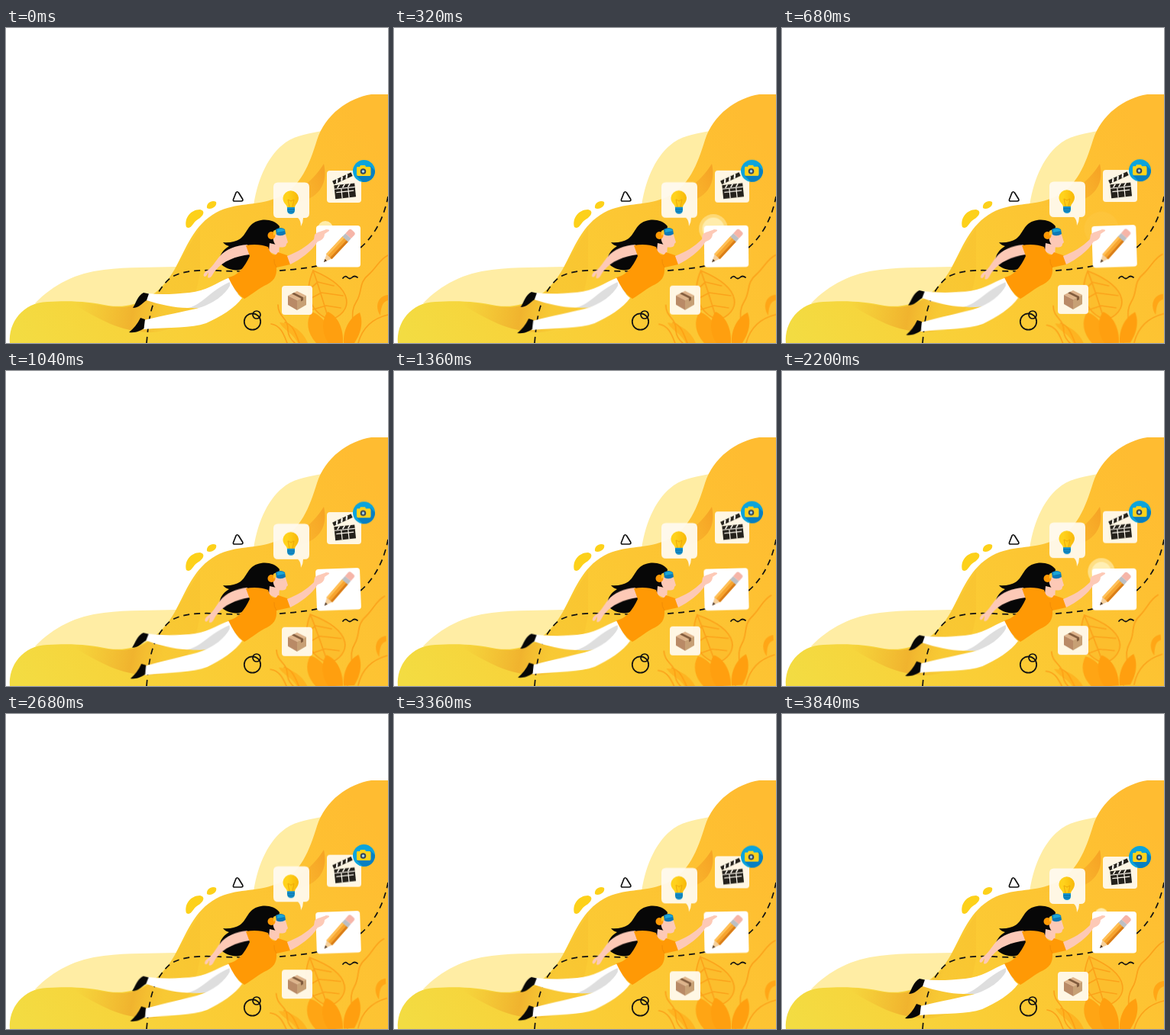
These frames come from a looping animation (500x413 px, 3.88 s). An HTML page without scripts:

```html
<!DOCTYPE html>
<html lang="en">
<head>
<meta charset="utf-8">
<title>Floating creator</title>
<style>
html, body { margin: 0; width: 100%; height: 100%; overflow: hidden; background: #fff; }
svg { display: block; width: 500px; height: 413px; }

.bob { animation: bob 3.88s cubic-bezier(.37, 0, .63, 1) infinite; }
.tilt { animation: tilt 1.94s cubic-bezier(.37, 0, .63, 1) infinite; }
.sway { --a: -4deg; transform-origin: 430px 413px; animation: tilt 3.88s cubic-bezier(.37, 0, .63, 1) infinite; }
@keyframes bob { 50% { transform: translateY(var(--y)); } }
@keyframes tilt { 50% { transform: rotate(var(--a)); } }

.front-leg { --a: -1.9deg; transform-origin: 295px 345px; }
.rear-leg { --a: 2deg; transform-origin: 290px 335px; }
.back-arm { --a: -2.8deg; transform-origin: 316px 290px; }
.note { --a: -2.2deg; transform-origin: 435px 286px; }

.ripple { fill: #fff6c8; transform-origin: 418px 263px; animation: ripple 1.94s linear infinite; }
.late { animation-delay: -1.77s; }
@keyframes ripple {
  0% { transform: scale(1); opacity: .8; }
  14% { transform: scale(1.8); opacity: .55; }
  28% { transform: scale(2.3); opacity: 0; }
  85% { transform: scale(0); opacity: 0; }
  86% { transform: scale(0); opacity: .8; }
  100% { transform: scale(1); opacity: .8; }
}

.line { fill: none; stroke: #111; stroke-width: 1.7; stroke-linecap: round; stroke-linejoin: round; }
.card { fill: #fffaf0; fill-opacity: .94; }
.pale { fill: #ffeda4; }
.skin { fill: #fdc9b6; }
.ink { fill: #070707; }
.white { fill: #fff; }
.vein { fill: none; stroke: #fba21a; stroke-width: 1.7; stroke-linecap: round; }
.leaf { fill: #ff9f0f; }
</style>
</head>
<body>
<svg viewBox="0 0 500 413">
  <defs>
    <linearGradient id="hill" gradientUnits="userSpaceOnUse" x1="20" y1="413" x2="460" y2="110">
      <stop offset="0" stop-color="#f3dc42"/>
      <stop offset=".45" stop-color="#fbcb34"/>
      <stop offset="1" stop-color="#ffbc31"/>
    </linearGradient>
    <linearGradient id="foldLow" gradientUnits="userSpaceOnUse" x1="90" y1="365" x2="205" y2="385">
      <stop offset="0" stop-color="#f0b52e" stop-opacity="0"/>
      <stop offset=".65" stop-color="#efae2c" stop-opacity=".85"/>
      <stop offset="1" stop-color="#f6bd2d" stop-opacity=".35"/>
    </linearGradient>
    <linearGradient id="foldHigh" gradientUnits="userSpaceOnUse" x1="340" y1="230" x2="418" y2="195">
      <stop offset="0" stop-color="#f6b12b" stop-opacity="0"/>
      <stop offset="1" stop-color="#f5a023" stop-opacity=".85"/>
    </linearGradient>
    <linearGradient id="bulb">
      <stop offset=".3" stop-color="#ffd21c"/>
      <stop offset="1" stop-color="#f8b808"/>
    </linearGradient>
  </defs>

  <!-- hills -->
  <path class="pale" d="M38 361C62 336 92 321 128 317C160 313 192 314 224 313L210 375H60Z"/>
  <path class="pale" d="M324 232C330 195 344 166 366 150C381 140 398 138 414 135L405 220Z"/>
  <path fill="url(#hill)" d="M5 413C3 386 22 360 54 359C88 357 109 359 134 364C170 369 200 352 221 316C236 288 246 258 275 242C302 228 325 234 354 223C386 211 398 176 407 147C418 113 448 92 478 87H500V413Z"/>
  <path fill="url(#foldLow)" d="M85 360C112 359 129 366 152 366C184 364 207 344 222 314L254 262V320C246 370 230 398 190 399C150 399 120 381 85 360Z"/>
  <path fill="url(#foldHigh)" d="M326 231C372 226 400 204 416 178C421 200 413 216 396 224C374 234 350 235 326 231Z"/>

  <!-- foliage -->
  <g class="sway">
    <g class="vein">
      <path fill="#fbb829" fill-opacity=".55" d="M402 318C390 346 396 371 424 383C454 373 459 342 402 318Z"/>
      <path d="M402 318Q414 352 431 413M408 333L397 343M413 347L396 356M419 364L402 369M408 333L429 338M413 347L441 351M419 364L438 367"/>
      <path d="M356 363C356 380 370 379 369 397Q370 406 378 413M365 386C375 388 379 400 384 413M347 388C360 390 364 403 368 413"/>
      <path d="M447 413C461 387 447 377 459 358C467 345 461 334 475 323C486 313 489 303 500 298M461 413C467 391 483 380 500 376"/>
    </g>
    <path class="leaf" d="M400 372C413 376 426 393 432 413H406C394 400 392 384 400 372Z" opacity=".85"/>
    <path class="leaf" d="M421 372C434 377 442 394 441 413H422C413 400 413 382 421 372Z"/>
    <path class="leaf" d="M463 373C469 389 462 404 456 413H442C441 396 449 380 463 373Z"/>
    <path class="leaf" d="M500 350C487 351 482 365 490 377C491 365 493 359 500 357Z" opacity=".8"/>
    <path class="leaf" d="M382 413C374 398 364 397 358 386C371 387 388 395 395 413Z" opacity=".5"/>
  </g>

  <!-- trail and doodles -->
  <path class="line" stroke-dasharray="8 6" style="stroke-linecap:butt" d="M184 413C187 380 190 349 216 327C240 313 276 319 305 319C350 320 403 317 440 303C473 289 493 258 500 221"/>
  <path fill="#fdd11a" d="M236 261C233 249 242 238 254 238C262 240 258 247 251 251C244 255 243 265 236 261ZM263 236C262 229 270 225 275 228C277 234 268 239 263 236Z"/>
  <path class="line" d="M297.500 225L301 216Q302.500 213.500 304.500 216L309.500 224Q311 227 307.500 227H299Q297 227 297.500 225Z"/>
  <path class="line" d="M441 328Q444 324 447 327T453 327T460 327"/>
  <circle class="line" cx="322.500" cy="385" r="10.700"/>
  <circle class="line" cx="328" cy="376" r="5"/>

  <!-- clapper card -->
  <g class="bob" style="--y:-3.500px">
    <rect class="card" x="420" y="187" width="45" height="42" rx="4"/>
    <g transform="rotate(-6 442 212)">
      <path fill="#25221c" d="M430 205H457V223H430Z"/>
      <path stroke="#fffaf0" stroke-width="1.200" d="M430 210H457M432 214.500H455M439 210V223M448 210V223"/>
      <g transform="rotate(-19 430 204)">
        <path fill="#25221c" d="M430 199H457V204H430Z"/>
        <path stroke="#fffaf0" stroke-width="2.200" d="M434 204L437 199M441 204L444 199M448 204L451 199"/>
      </g>
      <path stroke="#fffaf0" stroke-width="1.600" d="M434 209L437 205M441 209L444 205M448 209L451 205"/>
    </g>
  </g>

  <!-- camera badge -->
  <g class="bob" style="--y:-3px">
    <circle cx="468.500" cy="187.500" r="14.500" fill="#0ba4dc"/>
    <path fill="#087fc1" d="M477 181L483 187A14.500 14.500 0 0 1 467 202L459 194Z"/>
    <path fill="#ffd21c" d="M460 182H463L464 180H470L471 182H476Q477.500 182 477.500 184V192Q477.500 194 476 194H461Q459 194 459 192V184Q459 182 460 182Z"/>
    <circle cx="467.500" cy="188" r="3.800" fill="#35475a"/>
    <circle cx="467.500" cy="188" r="1.800" fill="#a9d9ee"/>
  </g>

  <!-- bulb card -->
  <g class="bob" style="--y:-4px">
    <path class="card" d="M356 202.500H391Q397 202.500 397 208.500V243Q397 249 391 249H389Q389 255 386 260Q386 252 382 249H356Q350 249 350 243V208.500Q350 202.500 356 202.500Z"/>
    <path fill="url(#bulb)" d="M368 236C368 231 362 230 362.500 222.500A10.300 10.300 0 0 1 383 222.500C383 230 378 231 378 236Z"/>
    <path fill="none" stroke="#eda80a" d="M371 235L369 225L373 227L377 225L375 235"/>
    <path fill="#1593cf" d="M368 235H378V240Q377 244 373 244Q369 244 368 240Z"/>
    <path stroke="#0b699d" d="M368 238H378M369 241H377"/>
  </g>

  <!-- package card -->
  <g class="bob" style="--y:-4px">
    <rect class="card" x="361" y="338" width="40" height="38" rx="4"/>
    <path fill="#deb48c" d="M381 345L393 351L381 357L369 351Z"/>
    <path fill="#b98a66" d="M369 351L381 357V370L369 363Z"/>
    <path fill="#c7a075" d="M393 351L381 357V370L393 363Z"/>
    <path fill="#805b3d" d="M374 348.500L377 347L389 353V357L386 358.500V354.500Z"/>
  </g>

  <!-- woman -->
  <path class="ink" d="M358 260C350 249 330 249 321 258C313 266 312 277 298 280Q291 282 284 281Q287 285 292 286C282 292 278 301 280 308C286 315 297 319 306 317C321 314 322 298 336 294C347 291 354 285 356 276Z"/>
  <g class="rear-leg tilt">
    <path class="white" d="M293 327C275 334 262 345 240 347C220 349 203 350 185 348L184 357C206 364 230 369 250 366C270 366 289 357 301 347Z"/>
    <path fill="#dedede" d="M239 367C258 362 266 345 293 333L304 348C284 364 265 368 239 367Z"/>
    <path class="ink" d="M166 367C170 361 172 351 180 347L187 348.500L184 357C178 361 174 367 166 367Z"/>
  </g>
  <g class="front-leg tilt">
    <path class="white" d="M293 328C297 340 302 349 309 354C300 367 280 379 262 387C242 394 215 392 180 395L181 383C210 376 231 372 249 368C272 362 287 349 293 338Z"/>
    <path class="ink" d="M161 399C167 394 172 388 176 380L182 382L180.500 394C175 397 171 400 161 399Z"/>
  </g>
  <path class="skin" d="M345 282L358 285L357 299L344 293Z"/>
  <path class="skin" d="M351 268C356 265 363 266 366 271L369 281L367 283C367 288 362 288 356 287C350 283 348 276 351 268Z"/>
  <g class="back-arm tilt">
    <path class="skin" d="M316 284C301 285 288 290 280 299C274 306 270 313 265 317C259 320 257 325 260 326C264 325 263 321 265 321L264 327C269 330 271 320 275 317C284 306 300 299 319 297Z"/>
  </g>
  <path fill="#ff9905" d="M314 285C325 283 335 284 343 287C346 297 352 301 356 294L368 298L372 310L354 314C355 326 350 333 338 338C326 345 319 351 312 355C302 348 296 338 291 327C303 325 312 314 319 299Z"/>
  <path fill="none" stroke="#f28c05" d="M354 314Q350 308 351 303"/>
  <circle cx="347.500" cy="272" r="5" fill="#ff9905"/>
  <path fill="#ffc62b" d="M350 266L356 263V269L350 272Z"/>
  <path fill="#0b78b6" d="M353 264Q360 260 365 264L366 270Q360 274 354 271Z"/>
  <path fill="#1ba6d5" d="M355 264Q360 262 364 264L365 266L355 268Z"/>

  <!-- touched card -->
  <circle class="ripple" cx="418" cy="263" r="10"/>
  <circle class="ripple late" cx="418" cy="263" r="10"/>
  <g class="note tilt">
    <rect class="white" x="406" y="259" width="58" height="54.500" rx="4"/>
    <g transform="translate(416 307) rotate(-47)">
      <path fill="#f4cf9c" d="M0 0L11-5V5Z"/>
      <path fill="#4b3527" d="M0 0L4-1.800V1.800Z"/>
      <path fill="#f6a42f" d="M10-5H42V5H10Z"/>
      <path fill="#d97d18" d="M10 2H42V5H10Z"/>
      <path fill="#ffc056" d="M10-5H42V-2H10Z"/>
      <path fill="#bcbfc4" d="M41-5H47V5H41Z"/>
      <path fill="#f6b5a8" d="M47-5H53Q56-5 56-2V2Q56 5 53 5H47Z"/>
    </g>
  </g>
  <path class="skin" d="M368 299C381 294 393 287 403 277L404 271C407 267 413 267 419 264Q424 264 423 266L417 270C417 276 412 279 408 280C400 293 386 303 372 310Z"/>
</svg>
</body>
</html>
```
